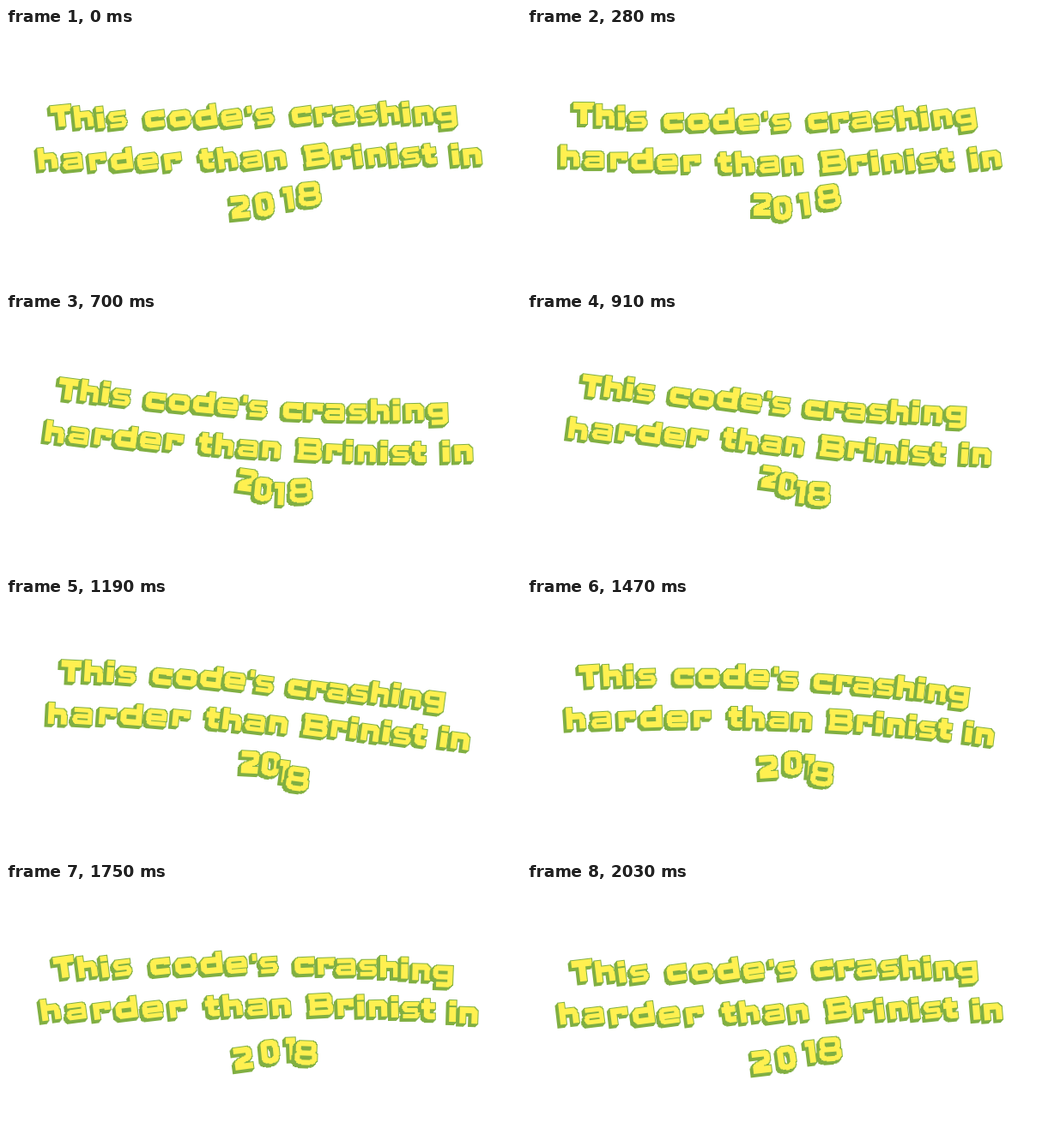
These frames come from a looping animation (600 px wide and 300 px high, 2100 ms). An HTML page without scripts:

```html
<!DOCTYPE html>
<html lang="en">
<head>
<meta charset="utf-8">
<title>Wavy text</title>
<style>
@property --t { syntax: "<angle>"; inherits: true; initial-value: 0deg; }
html, body { margin: 0; width: 100%; height: 100%; overflow: hidden; background: #fff; }
svg {
  display: block; width: 600px; height: 300px;
  fill: none; stroke: #fff050; stroke-width: 7; shape-rendering: crispEdges;
  animation: turn 2.1s steps(30) infinite;
}
@keyframes turn { from { --t: 0deg; } to { --t: 360deg; } }

/* each letter swings on a diagonal, half a turn late at the line's end;
   its tilt follows later, a quarter turn late at the line's end */
use {
  --g: #80af42;
  --u: calc(var(--i) / var(--n));
  --c: cos(var(--t) - 180deg * var(--u));
  --tilt: cos(var(--t) - 135deg - 90deg * var(--u));
  transform-origin: 12px 9px;
  transform:
    translate(calc(1px * (var(--x) + 2.5 - 6.5 * var(--c))),
              calc(1px * (var(--y) + var(--drop) * var(--u) + 9 * var(--c))))
    rotate(calc(8deg * var(--tilt)));
  filter:
    drop-shadow(1px 0 0 var(--g)) drop-shadow(-1px 0 0 var(--g))
    drop-shadow(0 1px 0 var(--g)) drop-shadow(0 -1px 0 var(--g))
    drop-shadow(-1px 1.6px 0 var(--g)) drop-shadow(-1px 1.6px 0 var(--g))
    drop-shadow(-1px 1.6px 0 var(--g));
}
.l1 { --n: 19; --y: 81; --drop: 14; }
.l2 { --n: 21; --y: 130.5; --drop: 13; }
.l3 { --n: 3; --y: 187; --drop: 2; }
</style>
</head>
<body>
<svg viewBox="0 0 600 300" role="img" aria-label="This code's crashing harder than Brinist in 2018">
<defs>
  <path id="T" d="M0 4H24M12 4V25" stroke-width="8"/>
  <path id="B" d="M4 0V25M0 3H20Q24 3 24 7.5T20 12.5H4M20 12.5Q25 12.5 25 17.5T20 22H0" stroke-width="6.5"/>
  <path id="a" d="M2 8.5H17Q20.5 8.5 20.5 12V25M20 15.5H8Q3 15.5 3 19T7 22.5H20" stroke-width="5.5"/>
  <path id="c" d="M19.5 14V9.5H8Q3.5 9.5 3.5 13V18Q3.5 21.5 8 21.5H22"/>
  <path id="d" d="M21 9.5H8Q3.5 9.5 3.5 13.5V17.5Q3.5 21.5 8 21.5H21M21 0V25"/>
  <path id="e" d="M4 16H21V12Q21 8.5 17 8.5H8Q3 8.5 3 12V19Q3 22.5 8 22.5H23" stroke-width="5.5"/>
  <path id="g" d="M20 9H7Q3 9 3 12.5V15.5Q3 19 7 19H20M20 6V25Q20 28 16 28H4" stroke-width="6"/>
  <path id="h" d="M4 0V25M4 10H14Q19 10 19 14V25"/>
  <path id="i" d="M4 8V25M4 0V5.5" stroke-width="7.5"/>
  <path id="n" d="M4 6V25M4 9.5H14Q18.5 9.5 18.5 13.5V25"/>
  <path id="o" d="M8 9.5H17Q21 9.5 21 13.5V17.5Q21 21.5 17 21.5H8Q3.5 21.5 3.5 17.5V13.5Q3.5 9.5 8 9.5Z"/>
  <path id="r" d="M4 6V25M4 10Q9 9.5 17.5 9.5V15"/>
  <path id="s" d="M20 8.5H6Q3 8.5 3 12Q3 15.5 7 15.5H14Q18 15.5 18 19Q18 22.5 14 22.5H1" stroke-width="5.5"/>
  <path id="t" d="M6 1V18Q6 21.5 10 21.5H16M0 9.5H16"/>
  <path id="ap" d="M3 2V10" stroke-width="5"/>
  <path id="d2" d="M1 3.5H15Q19 3.5 19 8.5Q19 12 15 13.5L6 17Q4 18 4 22H22"/>
  <path id="d0" d="M9 3.5H13Q18 3.5 18 9V18.5Q18 24 13 24H9Q4 24 4 18.5V9Q4 3.5 9 3.5Z"/>
  <path id="d1" d="M1 4H8V27"/>
  <path id="d8" d="M7 3H17Q21 3 21 8T17 13.5H7Q3 13.5 3 8T7 3ZM7 13.5H17Q22 13.5 22 19T17 24.5H7Q2 24.5 2 19T7 13.5Z" stroke-width="6"/>
</defs>

<g class="l1">
  <use href="#T" style="--i:0;--x:56"/>
  <use href="#h" style="--i:1;--x:82"/>
  <use href="#i" style="--i:2;--x:109"/>
  <use href="#s" style="--i:3;--x:122"/>
  <use href="#c" style="--i:5;--x:163"/>
  <use href="#o" style="--i:6;--x:191"/>
  <use href="#d" style="--i:7;--x:220"/>
  <use href="#e" style="--i:8;--x:249"/>
  <use href="#ap" style="--i:9;--x:278"/>
  <use href="#s" style="--i:10;--x:287"/>
  <use href="#c" style="--i:12;--x:327"/>
  <use href="#r" style="--i:13;--x:353"/>
  <use href="#a" style="--i:14;--x:375"/>
  <use href="#s" style="--i:15;--x:403"/>
  <use href="#h" style="--i:16;--x:427"/>
  <use href="#i" style="--i:17;--x:453"/>
  <use href="#n" style="--i:18;--x:466"/>
  <use href="#g" style="--i:19;--x:492"/>
</g>

<g class="l2">
  <use href="#h" style="--i:0;--x:40"/>
  <use href="#a" style="--i:1;--x:69"/>
  <use href="#r" style="--i:2;--x:99"/>
  <use href="#d" style="--i:3;--x:125"/>
  <use href="#e" style="--i:4;--x:155"/>
  <use href="#r" style="--i:5;--x:185"/>
  <use href="#t" style="--i:7;--x:226"/>
  <use href="#h" style="--i:8;--x:245"/>
  <use href="#a" style="--i:9;--x:273"/>
  <use href="#n" style="--i:10;--x:301"/>
  <use href="#B" style="--i:12;--x:344"/>
  <use href="#r" style="--i:13;--x:376"/>
  <use href="#i" style="--i:14;--x:400"/>
  <use href="#n" style="--i:15;--x:413"/>
  <use href="#i" style="--i:16;--x:440"/>
  <use href="#s" style="--i:17;--x:453"/>
  <use href="#t" style="--i:18;--x:476"/>
  <use href="#i" style="--i:20;--x:510"/>
  <use href="#n" style="--i:21;--x:522"/>
</g>

<g class="l3">
  <use href="#d2" style="--i:0;--x:265"/>
  <use href="#d0" style="--i:1;--x:290"/>
  <use href="#d1" style="--i:2;--x:316"/>
  <use href="#d8" style="--i:3;--x:332"/>
</g>
</svg>
</body>
</html>
```
